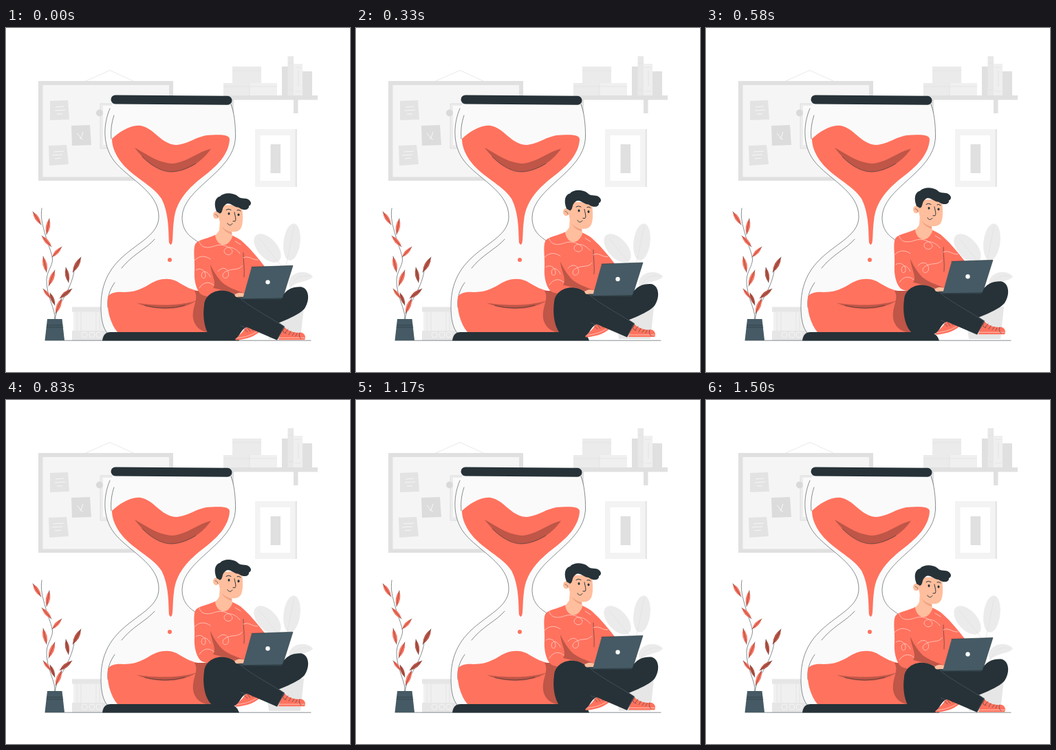
These frames come from a looping animation (500x500 px, 1540 ms). An HTML page:

```html
<!DOCTYPE html>
<html lang="en">
<head>
<meta charset="utf-8">
<title>Waiting by the hourglass</title>
<style>
html, body { margin: 0; height: 100%; overflow: hidden; background: #fff; }
svg { display: block; width: 100%; height: 100%; }
.coral { fill: #ff725e; }
.shade { fill: #bf5647; }
.dark { fill: #263238; }
.slate { fill: #455a64; }
.skin { fill: #ffbe9d; }
.line { fill: none; stroke: #263238; stroke-width: .55; stroke-linecap: round; }
.bold { stroke-width: 1; }
.pale { fill: none; stroke: #ffd3c8; stroke-width: .8; stroke-linecap: round; }
.thin { fill: none; stroke: #e0e0e0; stroke-width: .7; }
</style>
</head>
<body>
<svg viewBox="0 0 500 500">
  <!-- pin board -->
  <path class="thin" d="M116 77L151 61.500L185 77"/>
  <path fill="#e0e0e0" d="M47 77H243V222H47Z"/>
  <path fill="#f5f5f5" d="M53.500 83H237V216.500H53.500Z"/>
  <g fill="#e3e3e3">
    <path d="M64 106L90 105L92 133L64 134Z"/>
    <path fill="#dcdcdc" d="M95 142L122 141L124 170L96 171Z"/>
    <path d="M62 171L88 170L91 198L63 200Z"/>
    <path fill="#ececec" stroke="#dedede" d="M137 110H170V175H137Z"/>
    <circle cx="136" cy="123.500" r="5" fill="#d9d9d9"/>
    <path fill="#fafafa" d="M141 113H160V170H141Z"/>
  </g>
  <path fill="none" stroke="#f7f7f7" d="M72 115L84 114M71 120L86 119M74 125L82 125M69 180L84 179M67 185L82 184M71 190L80 189M103 153L109 160L112 151M107 160L112 162"/>

  <!-- shelf -->
  <path fill="#e0e0e0" d="M316 98H453V104.500H316ZM418 104H424.500V124H418ZM325 104H331V124H325Z"/>
  <path fill="#ebebeb" d="M329 56H371V80H329ZM316 80H354V98H316Z"/>
  <path fill="#f0f0f0" d="M354 80H394V98H354Z"/>
  <path class="thin" d="M329 62H371M316 85H394M354 80V98"/>
  <path fill="#e0e0e0" d="M401 56H410V98H401ZM431 63H445V98H431Z"/>
  <path fill="#e8e8e8" d="M409.500 41H418V98H409.500Z"/>
  <path fill="#efefef" d="M418 52H431V98H418Z"/>
  <path class="thin" d="M409.500 51H418M411 90H417M420 57H429M420 92H429M425 62V85"/>

  <!-- picture frame -->
  <path fill="#f3f3f3" d="M362 147H423V231H362Z"/>
  <path fill="#e6e6e6" d="M420.500 147H423V231H420.500Z"/>
  <path fill="#fff" d="M369.500 156H413V222H369.500Z"/>
  <path fill="#e0e0e0" d="M384.500 169H399V211H384.500Z"/>

  <!-- storage box -->
  <path fill="#f0f0f0" d="M98 412H150V454H98Z"/>
  <path fill="#e6e6e6" d="M96 405.500H150V412.500H96ZM96 440H150V454H96Z"/>
  <path class="thin" d="M103 413V440M109 413V440M131 413V440M136 413V440"/>
  <g fill="none" stroke="#f5f5f5"><circle cx="114" cy="446" r="4"/><circle cx="125" cy="446" r="4"/><circle cx="135" cy="446" r="4"/></g>

  <path class="line" d="M57 454.200H443"/>

  <!-- pale plant -->
  <g fill="#ebebeb">
    <ellipse cx="380" cy="320" rx="25" ry="14" transform="rotate(48 380 320)"/>
    <ellipse cx="415.500" cy="311" rx="12" ry="27" transform="rotate(7 415.500 311)"/>
    <path d="M411 370C413 354 436 350 446 361C442 369 424 367 412 378Z"/>
    <path fill="#e6e6e6" d="M376 405H433L428 452H382Z"/>
  </g>
  <path class="thin" d="M368 306L404 350L405 405M419 287L406 350M442 361C424 357 412 366 408 405"/>

  <!-- hourglass -->
  <path fill="#fafafa" d="M155 110C142 135 138 168 157 193C177 219 223 238 222 275C221 318 138 320 138 404C138 424 141 436 147 443H330V340C300 318 256 315 256 275C257 232 331 210 333.500 160C334 140 331 120 326 110Z"/>
  <path class="line" d="M151 117C142 138 139 169 157 193C177 219 223 238 222 275C221 318 138 320 138 404C138 424 141 436 147 443M327 111C331 120 334 140 333.500 160C331 210 257 232 256 275C256 296 268 304 281 312"/>
  <path class="line" d="M157 127C153 139 152 150 153 161M216 307C204 321 184 329 168 349M158 370C150 381 147 392 148 406"/>
  <path class="coral" d="M154 161C165 151 181 140 196 142C216 146 224 168 247 170C267 169 278 155 300 155.500C313 155 325 155 325 162C324 182 309 198 293 211C271 228 247 247 244 280C242 295 243 304 241.500 312Q239.500 318 237 312C236 295 237 270 226 248C212 227 182 216 165 192C157 180 154 170 154 161Z"/>
  <path class="shade" d="M187 174C203 182 218 195 241 197C262 196 279 180 298 175.500C285 194 265 208 240 209C215 207 198 188 187 174Z"/>
  <path class="line" d="M198 187C216 205 231 209 240 209C253 209 266 203 276 197"/>
  <circle class="coral" cx="238" cy="337" r="3"/>
  <path class="coral" d="M148 391C151 385 160 383 170 384C187 384 195 380 206 374C220 364 236 362 248 368C260 375 271 383 290 383H310V442H162C152 430 146 410 148 391Z"/>
  <path class="shade" d="M190 399.500C215 404 255 404 278 396C263 405 248 408 232 408C215 408 200 404 190 399.500Z"/>
  <path class="line" d="M202 403.500Q232 411 260 403"/>
  <path class="shade" d="M300 382H274C281 394 270 404 272 422C274 433 282 440 291 442H297Z"/>
  <path stroke="#263238" stroke-width="13" stroke-linecap="round" d="M159 104L322 105.200"/>
  <path class="dark" d="M140 454.500C141 446 145 442 152 442H325Q336 444 339 454.500Z"/>

  <!-- potted twig -->
  <path class="line" d="M71 424C73 410 58 390 59 365C60 352 70 343 67 332C65 323 59 309 57 300C53 286 50 276 52 262M71 424C74 400 98 380 100 345"/>
  <g id="leaves"></g>
  <path class="slate" d="M60 423H81.500L85 454H56.500Z"/>
  <path class="line" d="M59.500 432H82.500M59 435H83"/>

  <g id="man">
    <!-- far leg and its shoe -->
    <path class="dark" d="M338 394H399C407 379 418 376 429 376.500C441 379 442 396 434 408C424 420 390 431 366 441L348 432Z"/>
    <path class="coral" d="M333 452C340 446 345 442 349 434L371 439C365 447 351 453 334 454Z"/>
    <path class="pale" d="M334 451C348 450 360 446 369 438"/>
    <path class="line" d="M347 438L351 442M351 436L355 441M355 435L359 440"/>

    <!-- near shoe -->
    <path class="coral" d="M404 434C409 440 418 444 430 443C435 445 436 450 434 453.500H396L400 441Z"/>
    <path class="pale" d="M397 450.500H434"/>
    <path class="line" d="M405 436C401 440 402 443 407 444M406 443L410 438M411 446L414 441M416 447L419 443M421 448L423 444M427 443C425 447 427 450 429 452"/>

    <!-- sweater -->
    <path class="coral" d="M304 301C294 306 280 308 276 313C271 319 275 340 274 352C273 366 276 379 282 386C290 393 306 391 322 387L345 392L357 349L376 347C366 334 356 322 345 312C340 307 334 304 329 302Z"/>
    <path class="shade" d="M297 344C301 353 306 361 314 370C322 377 334 381 344 385L342 390L326 384L301 378C307 370 298 358 297 344Z"/>
    <path class="line" d="M345 327C345 340 347 350 346 362"/>
    <path class="pale" d="M281 311C284 321 295 320 303 317C314 313 326 318 329 324C329 332 317 331 317 324C319 315 334 319 340 328M274 338C281 330 290 331 297 336M276 352C283 347 291 354 290 361C288 367 282 363 285 356C289 351 295 357 297 362M308 354C316 344 326 352 323 361C318 368 311 360 318 355C329 348 336 354 343 346M281 378C287 369 295 368 302 374M345 334C353 330 358 338 366 337M333 310L341 315"/>

    <!-- head -->
    <path class="skin" d="M311 279L310 294C308 298 305 300 304 302C307 318 322 321 329 304L328 293Z"/>
    <path fill="#eea284" d="M314 289C319 293 323 296 328 297L328 300C321 298 316 294 314 289Z"/>
    <ellipse class="skin" cx="305.500" cy="272" rx="4.500" ry="5.500"/>
    <path class="skin" d="M311 258L342 257C345 270 345 286 341 292C336 299 322 297 316 291C311 286 309 277 309 271Z"/>
    <path class="dark" d="M306 267C302 257 303 247 311 245C316 239 329 239 336 244C341 250 348 246 353 250C357 253 357 257 353 259C354 264 346 267 338 261C331 261 325 252 319 257C313 261 316 268 311 270Z"/>
    <path class="line bold" d="M320 264.500Q323 262 327 264.500M336 265Q339 263.500 341 266M332 268C333 274 335 278 333 281L330 281M322 284C324 288 327 287 329 284.500"/>
    <path class="line" d="M304 271Q307 271 308 275"/>
    <ellipse class="dark" cx="324" cy="270" rx="1.500" ry="1.900"/>
    <ellipse class="dark" cx="338" cy="271.500" rx="1.500" ry="1.900"/>

    <!-- near leg -->
    <path class="dark" d="M288 403C289 389 303 380 317 382C329 383 338 392 347 396L405 434L394 454L350 435C339 439 341 453 326 454H303C290 447 285 424 288 403Z"/>
    <path fill="none" stroke="#526169" stroke-width=".6" d="M338 391C350 403 384 421 404 434L395 452M341 433L349 436"/>

    <!-- laptop -->
    <path class="skin" d="M332 388C337 384 342 384 347 387L345 393L334 391Z"/>
    <path fill="#37474f" d="M337 391H402L400 394.500H343Z"/>
    <path class="slate" d="M357 347.500L417 345.500L402 393L344 394Z"/>
    <path class="line" d="M357 347.500L417 345.500L402 393L344 394"/>
    <circle cx="380.500" cy="369.500" r="3.200" fill="#fafafa"/>
  </g>
</svg>
<script>
const LOOP = 1540, PEAK = 710, LIFT = 8.8;
const man = document.getElementById("man");

// Each leaf: base x, base y, tip x, tip y, shaded (1) or bright (0)
const leaves = [
  [51, 286, 39, 267, 0], [59, 300, 63, 277, 0], [66, 318, 52, 302, 0],
  [67, 333, 81, 318, 0], [59, 355, 54, 332, 0], [62, 375, 71, 352, 0],
  [65, 393, 54, 379, 0], [71, 403, 64, 385, 1], [97, 355, 109, 333, 1],
  [91, 370, 87, 348, 1], [78, 393, 96, 379, 1], [72, 415, 81, 393, 0]
];

function side(x, y, tx, ty, bulge) {
  const dx = tx - x, dy = ty - y;
  const cx = x + dx / 2 - dy * bulge, cy = y + dy / 2 + dx * bulge;
  return `M${x} ${y}Q${cx} ${cy} ${tx} ${ty}Z`;
}

document.getElementById("leaves").innerHTML = leaves.map(([x, y, tx, ty, shaded]) =>
  `<path class="${shaded ? "shade" : "coral"}" d="${side(x, y, tx, ty, .27)}${side(x, y, tx, ty, -.27)}"/>
   <path class="line" d="M${x} ${y}L${tx} ${ty}"/>`).join("");

function draw(now) {
  const phase = 2 * Math.PI * (now % LOOP - PEAK) / LOOP;
  const rise = LIFT * (1 + Math.cos(phase)) / 2;
  man.setAttribute("transform", `translate(0 ${-rise})`);
  requestAnimationFrame(draw);
}
draw(performance.now());
</script>
</body>
</html>
```
